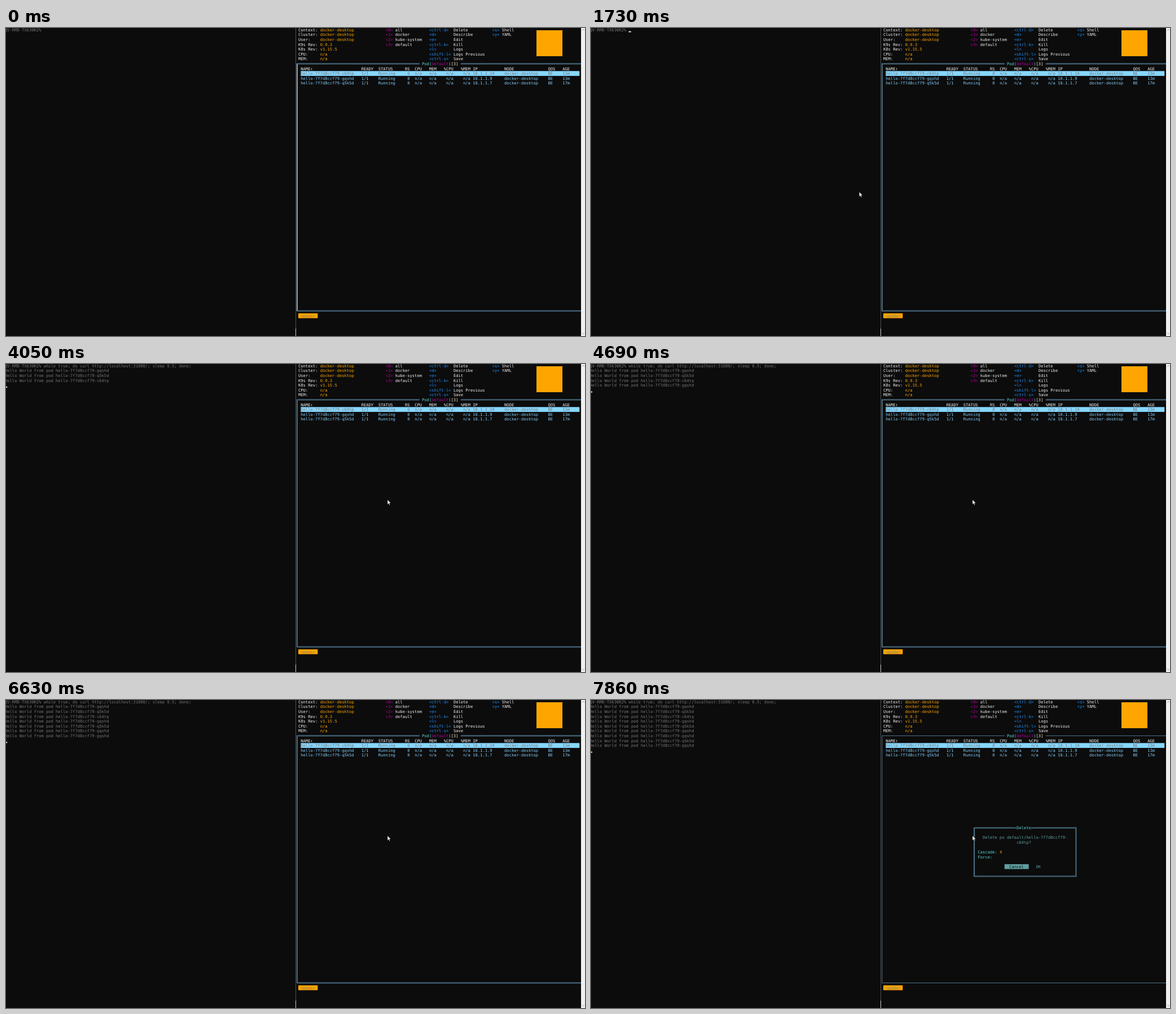
These frames come from a looping animation (1026 px wide and 546 px high, 8000 ms). An HTML page:

```html
<!DOCTYPE html>
<html lang="en">
<head>
<meta charset="utf-8">
<title>Terminal session</title>
<style>
html, body { margin: 0; width: 100%; height: 100%; overflow: hidden; background: #0c0c0c; }
svg { display: block; width: 1026px; height: 546px; }
text {
  font-family: "DejaVu Sans Mono", monospace;
  font-size: 7.134px;
  white-space: pre;
  text-rendering: geometricPrecision;
}
</style>
</head>
<body>
<svg id="stage" viewBox="0 0 1026 546"></svg>
<script>
const LOOP = 8000, CW = 4.295, RH = 8.59;
const BG = '#0c0c0c', WHITE = '#f2f2f2', GREY = '#767676', ORANGE = '#ffa500',
  MAGENTA = '#b4009e', BLUE = '#1e90ff', SKY = '#87cefa', AQUA = '#61d6d6', TEAL = '#5f9ea0';
const stage = document.getElementById('stage');

function el(tag, attrs, parent = stage) {
  const node = document.createElementNS('http://www.w3.org/2000/svg', tag);
  for (const k in attrs) node.setAttribute(k, attrs[k]);
  parent.appendChild(node);
  return node;
}
const colX = c => 513.7 + CW * c;
const rowY = r => RH * r - 1;
const midX = c => colX(c) + CW / 2;
const midY = r => rowY(r) + RH / 2;

function textAt(x, row, str, fill, parent) {
  const node = el('text', { x, y: rowY(row) + 6.85, fill }, parent);
  node.textContent = str;
  return node;
}
const put = (col, row, str, fill, parent) => textAt(colX(col), row, str, fill, parent);
const rect = (x, y, width, height, fill, parent) => el('rect', { x, y, width, height, fill }, parent);
const cells = (col, row, n, fill, parent) => rect(colX(col), rowY(row), n * CW, RH, fill, parent);
const show = (node, on) => node.setAttribute('visibility', on ? 'visible' : 'hidden');

// Terminal box border with a gap for its title
function frame(x1, y1, x2, y2, gap1, gap2, double, parent) {
  const g = el('g', { fill: 'none', stroke: SKY, 'stroke-width': 0.54 }, parent);
  for (const d of double ? [-0.54, 0.54] : [0]) {
    const [l, t, r, b] = [x1 + d, y1 + d, x2 - d, y2 - d];
    el('path', { d: `M${gap1} ${t}H${l}V${b}H${r}V${t}H${gap2}` }, g);
  }
  return g;
}

rect(0, 0, 1026, 546, BG);

// Left terminal
const HOST = 'QV-RMD-TX630K2% ';
const COMMAND = 'while true; do curl http://localhost:31000/; sleep 0.5; done;';
const LEFT = -2;
const OUTPUT = [
  [2810, 'gqshd'], [3440, 'q5k5d'], [4050, 'c64tp'], [4680, 'gqshd'], [5300, 'q5k5d'],
  [6000, 'gqshd'], [6630, 'gqshd'], [7240, 'q5k5d'], [7860, 'gqshd']
];
const prompt = textAt(LEFT, 0, HOST, GREY);
const lines = OUTPUT.map(([, id], i) =>
  textAt(LEFT, i + 1, 'Hello World from pod hello-7f7d8ccf79-' + id, GREY));
const caret = rect(0, 0, CW, 1.8, WHITE);

// Window edge
rect(513, 0, 1, 546, '#505050');
rect(513, 533, 1, 13, '#d0d0d0');

// Header
[['Context:', 'docker-desktop'], ['Cluster:', 'docker-desktop'], ['User:', 'docker-desktop'],
 ['K9s Rev:', '0.9.3'], ['K8s Rev:', 'v1.15.5'], ['CPU:', 'n/a'], ['MEM:', 'n/a']
].forEach(([label, value], r) => {
  put(1, r, label, WHITE);
  put(10, r, value, ORANGE);
});
['all', 'docker', 'kube-system', 'default'].forEach((name, r) => {
  put(37, r, `<${r}>`, MAGENTA);
  put(41, r, name, WHITE);
});
[['ctrl-d', 'Delete'], ['d', 'Describe'], ['e', 'Edit'], ['ctrl-k', 'Kill'],
 ['l', 'Logs'], ['shift-l', 'Logs Previous'], ['ctrl-s', 'Save']
].forEach(([key, name], r) => {
  put(55, r, `<${key}>`, BLUE);
  put(65, r, name, WHITE);
});
[['s', 'Shell'], ['y', 'YAML']].forEach(([key, name], r) => {
  put(81, r, `<${key}>`, BLUE);
  put(85, r, name, WHITE);
});
rect(940, 4, 46, 46, ORANGE);

// Pod table
const tableBox = [midX(0), midY(7), 1022, midY(58), colX(51), colX(68)];
const focused = frame(...tableBox, true);
const blurred = frame(...tableBox, false);
const activeEdge = rect(midX(0) - 0.5, midY(7), 1, 51 * RH, '#d8e4ec');
put(52, 7, 'Pod(', AQUA);
put(56, 7, 'default', MAGENTA);
put(63, 7, ')', AQUA);
put(64, 7, '[3]', '#ffefd5');

const COLS = [2, 27, 34, 45, 49, 55, 61, 68, 73, 86, 104, 110];
['NAME↑', 'READY', 'STATUS', 'RS', 'CPU', 'MEM', '%CPU', '%MEM', 'IP', 'NODE', 'QOS', 'AGE']
  .forEach((name, i) => put(COLS[i], 8, name, WHITE));
cells(2, 9, 115, '#87d7ff');
[['c64tp', '10.1.1.10', '13m'], ['gqshd', '10.1.1.9', '13m'], ['q5k5d', '10.1.1.7', '17m']]
  .forEach(([id, ip, age], i) => {
    const row = ['hello-7f7d8ccf79-' + id, '1/1', 'Running', ' 0', 'n/a', 'n/a', ' n/a', ' n/a',
      ip, 'docker-desktop', 'BE', age];
    row.forEach((str, c) => put(COLS[c], 9 + i, str, i ? SKY : GREY));
  });
cells(1, 59, 8, ORANGE);
put(2, 59, '<pods>', GREY);

// Scrollbar
rect(1019, 0, 7, 546, '#f0f0f0');
for (const d of ['M1021 4.4L1023 2.4L1025 4.4', 'M1021 540.6L1023 542.6L1025 540.6'])
  el('path', { d, fill: 'none', stroke: '#808080', 'stroke-width': 0.8 });

// Delete dialog
const dialog = el('g', {});
rect(colX(38), rowY(26), 43 * CW, 11 * RH, BG, dialog);
frame(midX(38), midY(26), midX(80), midY(36), colX(55), colX(63), true, dialog);
put(55, 26, '<Delete>', AQUA, dialog);
put(42, 28, 'Delete po default/hello-7f7d8ccf79-', TEAL, dialog);
put(56, 29, 'c64tp?', TEAL, dialog);
put(40, 31, 'Cascade:', AQUA, dialog);
put(40, 32, 'Force:', AQUA, dialog);
const fields = [
  cells(49, 31, 1, ORANGE, dialog),
  cells(49, 32, 1, ORANGE, dialog),
  cells(51, 34, 10, TEAL, dialog)
];
const check = put(49, 31, 'X', ORANGE, dialog);
const cancel = put(53, 34, 'Cancel', TEAL, dialog);
put(64, 34, 'OK', TEAL, dialog);

const mouse = el('path', {
  d: 'M0 0V8.6L2 6.8L3.3 9.8L4.6 9.2L3.3 6.3H6Z',
  fill: '#fff', stroke: '#000', 'stroke-width': 0.5
});

const ease = p => p * p * (3 - 2 * p);
const mix = (a, b, p) => a + (b - a) * p;

function mousePos(t) {
  if (t < 200) return null;
  if (t < 3590) {
    const p = ease(Math.min(9, Math.floor((t - 200) / 75.5)) / 9);
    return [mix(943, 475.3, p), mix(534, 290.5, p)];
  }
  const p = ease(Math.min(4, 1 + Math.floor((t - 3590) / 76.6)) / 4);
  return [mix(475.3, 676, p), mix(290.5, 240.5, p)];
}

function draw(t) {
  prompt.textContent = HOST + (t >= 1960 ? COMMAND : '');
  const count = OUTPUT.filter(([at]) => t >= at).length;
  lines.forEach((line, i) => show(line, i < count));

  const col = t < 1960 ? HOST.length : t < 2740 ? HOST.length + COMMAND.length : 0;
  const row = t < 2740 ? 0 : count + 1;
  caret.setAttribute('x', LEFT + col * CW);
  caret.setAttribute('y', rowY(row) + 6.7);
  show(caret, t >= 1730);
  show(activeEdge, t < 1180);

  const open = t >= 7160;
  const focus = t < 7620 ? 0 : t < 7860 ? 1 : 2;
  show(focused, !open);
  show(blurred, open);
  dialog.setAttribute('display', open ? 'inline' : 'none');
  fields.forEach((field, i) => field.setAttribute('display', i === focus ? 'inline' : 'none'));
  check.setAttribute('fill', focus === 0 ? BG : ORANGE);
  cancel.setAttribute('fill', focus === 2 ? BG : TEAL);

  const pos = mousePos(t);
  show(mouse, pos);
  if (pos) mouse.setAttribute('transform', `translate(${pos[0]} ${pos[1]})`);
}

const start = performance.now();
function tick(now) {
  draw(Math.max(0, now - start) % LOOP);
  requestAnimationFrame(tick);
}
draw(0);
requestAnimationFrame(tick);
</script>
</body>
</html>
```
